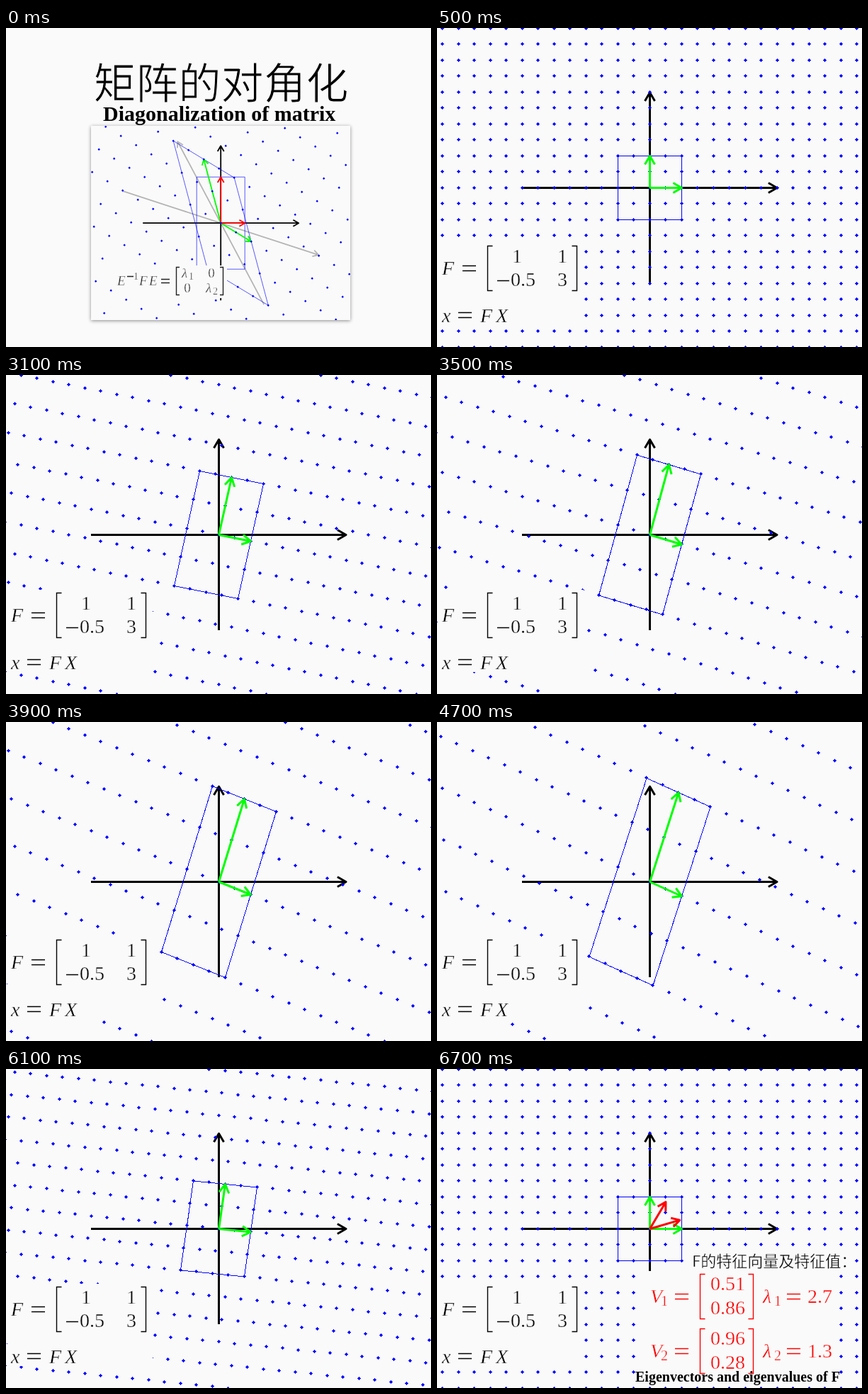
These frames come from a looping animation (600 by 450 pixels, 8 s). An HTML page:

```html
<!DOCTYPE html>
<html lang="zh-CN">
<head>
<meta charset="utf-8">
<title>矩阵的对角化</title>
<style>
html, body { margin: 0; width: 100%; height: 100%; overflow: hidden; background: #fafafa; }
svg { display: block; width: 600px; height: 450px; }
text { white-space: pre; font-family: "Liberation Serif", "Times New Roman", serif; }
.cjk { font-family: "Noto Sans CJK SC", "Noto Sans CJK", sans-serif; font-weight: 300; }
/* a paper-coloured outline makes the strokes lighter */
.cjk, .math text, .small text { stroke: #fafafa; stroke-width: .4; }
.cjk.head { stroke-width: 1.1; }
.b { font-weight: 700; }
.i { font-style: italic; }
.m { text-anchor: middle; }
.math { font-size: 28px; }
.math .sub { font-size: 20px; }
.small { font-size: 19px; }
.small .sub { font-size: 14px; }
.rule { fill: none; stroke-width: 1.4; }
.arrow { fill: none; stroke-linejoin: round; }
.thin { fill: none; stroke: #00f; stroke-width: 1; }
#panel .thin { stroke-width: .65; }
.dots { fill: #00f; }
#plane .thin, #plane .dots { shape-rendering: crispEdges; }
.paper { fill: #fafafa; }
</style>
</head>
<body>
<svg viewBox="0 0 600 450">
  <defs>
    <clipPath id="frame"><rect x="120" y="138" width="366" height="274"/></clipPath>
    <filter id="shade" x="-10%" y="-10%" width="120%" height="120%">
      <feDropShadow dx="0" dy="1" stdDeviation="2.5" flood-color="#000" flood-opacity=".45"/>
    </filter>
  </defs>

  <g id="cover">
    <rect class="paper" x="120" y="138" width="366" height="274" filter="url(#shade)"/>
    <g id="panel" clip-path="url(#frame)"></g>
    <rect class="paper" x="152" y="335" width="160" height="46"/>
    <g class="small" fill="#222">
      <text class="i" x="157" y="363">E</text>
      <text class="sub" x="180" y="355">1</text>
      <text class="i" x="188" y="363">F</text>
      <text class="i" x="202" y="363">E</text>
      <text class="i" x="248" y="352">λ</text>
      <text class="sub" x="258" y="355">1</text>
      <text class="m" x="290" y="352">0</text>
      <text class="m" x="256" y="373">0</text>
      <text class="i" x="282" y="373">λ</text>
      <text class="sub" x="292" y="376">2</text>
      <path class="rule" stroke="#222" d="M171 350.5h9M219 354.5h12M219 359.5h12M245 337.5h-4.500v39h4.500M302 337.5h4.500v39h-4.500"/>
    </g>
    <text class="cjk head" x="123.500" y="100" font-size="60">矩阵的对角化</text>
    <text class="b" x="137" y="130.500" font-size="30">Diagonalization of matrix</text>
  </g>

  <g id="plane">
    <g id="axes"></g>
    <path id="grid" class="dots"/>
    <path id="cell" class="thin"/>
    <path id="base" class="arrow" stroke="#0f0" stroke-width="3"/>
    <rect class="paper" x="2" y="303" width="205" height="116"/>
    <g class="math">
      <text class="i" x="7" y="348">F</text>
      <text class="m" x="113" y="331">1</text>
      <text class="m" x="177" y="331">1</text>
      <text x="104" y="364">0.5</text>
      <text class="m" x="177" y="364">3</text>
      <text class="i" x="7" y="415">x</text>
      <text class="i" x="61" y="415">F</text>
      <text class="i" x="83" y="415">X</text>
      <path class="rule" stroke="#000" id="rules"/>
    </g>
  </g>

  <g id="eigen">
    <rect class="paper" x="290" y="285" width="274" height="146"/>
    <rect class="paper" x="358" y="260" width="228" height="25"/>
    <g id="vectors"></g>
    <g id="values" class="math" fill="#f00"></g>
    <text class="cjk" x="360" y="279" font-size="22">F的特征向量及特征值：</text>
    <text class="b" x="280" y="441" font-size="20">Eigenvectors and eigenvalues of F</text>
  </g>
</svg>
<script>
const $ = id => document.getElementById(id);
const LOOP = 8000, UNIT = 45;
const start = performance.now();

// Line from (x, y) by (dx, dy) with an open head of leg length h.
function arrow(x, y, dx, dy, h) {
  const a = Math.atan2(dy, dx), tx = x + dx, ty = y + dy;
  const leg = s => `${tx - h * Math.cos(a + s * Math.PI / 6)} ${ty - h * Math.sin(a + s * Math.PI / 6)}`;
  return `M${x} ${y}L${tx} ${ty}M${leg(1)}L${tx} ${ty}L${leg(-1)}`;
}

const stroke = (d, color, w) =>
  `<path class="arrow" d="${d}" stroke="${color}" stroke-width="${w}"/>`;

// Lattice points around (cx, cy) spanned by u and v.
function lattice(cx, cy, u, v, shape) {
  let d = "";
  for (let j = -20; j <= 20; j++)
    for (let i = -40; i <= 40; i++) {
      const x = cx + i * u[0] + j * v[0], y = cy + i * u[1] + j * v[1];
      if (x > -4 && x < 604 && y > -4 && y < 454) d += shape(x, y);
    }
  return d;
}

// Stepped diamond, five pixels wide.
function dot(x, y) {
  const px = Math.floor(x + 1e-6), py = Math.floor(y + 1e-6);
  return `M${px} ${py - 2}h1v1h1v1h1v1h-1v1h-1v1h-1v-1h-1v-1h-1v-1h1v-1h1z`;
}
const speck = (x, y) => `M${x} ${y - 1.7}l1.7 1.7l-1.7 1.7l-1.7 -1.7z`;

// Parallelogram with corners at ±u ±v.
function cellPath(cx, cy, u, v) {
  const pts = [[-1, -1], [1, -1], [1, 1], [-1, 1]]
    .map(([a, b]) => `${cx + a * u[0] + b * v[0]} ${cy + a * u[1] + b * v[1]}`);
  return `M${pts.join("L")}Z`;
}

const half = v => v.map(n => n / 2);
const equals = (x, y) => `M${x} ${y}h19M${x} ${y + 7}h19`;
const brackets = (l, r, y) => `M${l + 7} ${y}h-7v63h7M${r - 7} ${y}h7v63h-7`;

function drawPanel() {
  const cx = 303.2, cy = 275.2, u = [43, 26], v = [-24, -90];
  const ray = (dx, dy) => arrow(cx - dx, cy - dy, 2 * dx, 2 * dy, 9);
  const from = (dx, dy) => arrow(cx, cy, dx, dy, 9);
  $("panel").innerHTML =
    stroke(ray(138, 45) + ray(-61, -115), "#b4b4b4", 1.8) +
    stroke(ray(110, 0) + ray(0, -109), "#000", 1.8) +
    `<path class="thin" d="${cellPath(cx, cy, [34, 0], [0, 65])}${cellPath(cx, cy, u, v)}"/>` +
    stroke(from(...u) + from(...v), "#0f0", 1.8) +
    stroke(from(34, 0) + from(0, -65), "#f00", 1.8) +
    `<path class="dots" d="${lattice(cx, cy, half(u), half(v), speck)}"/>`;
}

function drawEigen() {
  const rows = [[1, 0, "0.51", "0.86", "2.7"], [2, 77, "0.96", "0.28", "1.3"]];
  let vectors = "", values = "";
  for (const [n, dy, a, b, value] of rows) {
    vectors += arrow(300.5, 225.5, a * (UNIT - 1), -b * (UNIT - 1), 13);
    const t = (x, y, s, c = "") => `<text class="${c}" x="${x}" y="${y + dy}">${s}</text>`;
    values += t(301, 330, "V", "i") + t(316, 334, n, "sub") +
      t(386, 312, a) + t(386, 346, b) +
      t(460, 330, "λ", "i") + t(476, 334, n, "sub") + t(523, 330, value) +
      `<path class="rule" stroke="#f00" d="${equals(336, 317.5 + dy)}${equals(494, 317.5 + dy)}${brackets(371.5, 446.5, 289.5 + dy)}"/>`;
  }
  $("vectors").innerHTML = stroke(vectors, "#f00", 3);
  $("values").innerHTML = values;
}

// Blend from the identity (s = 0) to F (s = 1).
function drawPlane(s) {
  const u = [UNIT, UNIT * s / 2], v = [UNIT * s, -UNIT * (1 + 2 * s)];
  const x = 300.5, y = 225.5;
  $("grid").setAttribute("d", lattice(300, 225, half(u), half(v), dot));
  $("cell").setAttribute("d", cellPath(x, y, u, v));
  $("base").setAttribute("d", arrow(x, y, ...u, 14) + arrow(x, y, ...v, 14));
}

drawPanel();
drawEigen();
$("axes").innerHTML = stroke(arrow(120, 225.5, 360, 0, 14) + arrow(300.5, 360, 0, -269, 14), "#000", 3);
$("rules").setAttribute("d",
  equals(36, 335.5) + equals(30, 401.5) + brackets(71.5, 197.5, 307.5) + "M85 356.5h17");

const show = (id, on) => { $(id).style.display = on ? "" : "none"; };
let last = -1;

function tick() {
  const t = (performance.now() - start) % LOOP;
  const up = Math.floor((t - 2300) / 200), down = 9 - Math.floor((t - 4700) / 200);
  const s = Math.max(0, Math.min(up, down, 10)) / 10;
  show("cover", t < 500);
  show("plane", t >= 500);
  show("eigen", t >= 6700);
  if (s !== last) drawPlane(last = s);
  requestAnimationFrame(tick);
}
tick();
</script>
</body>
</html>
```
